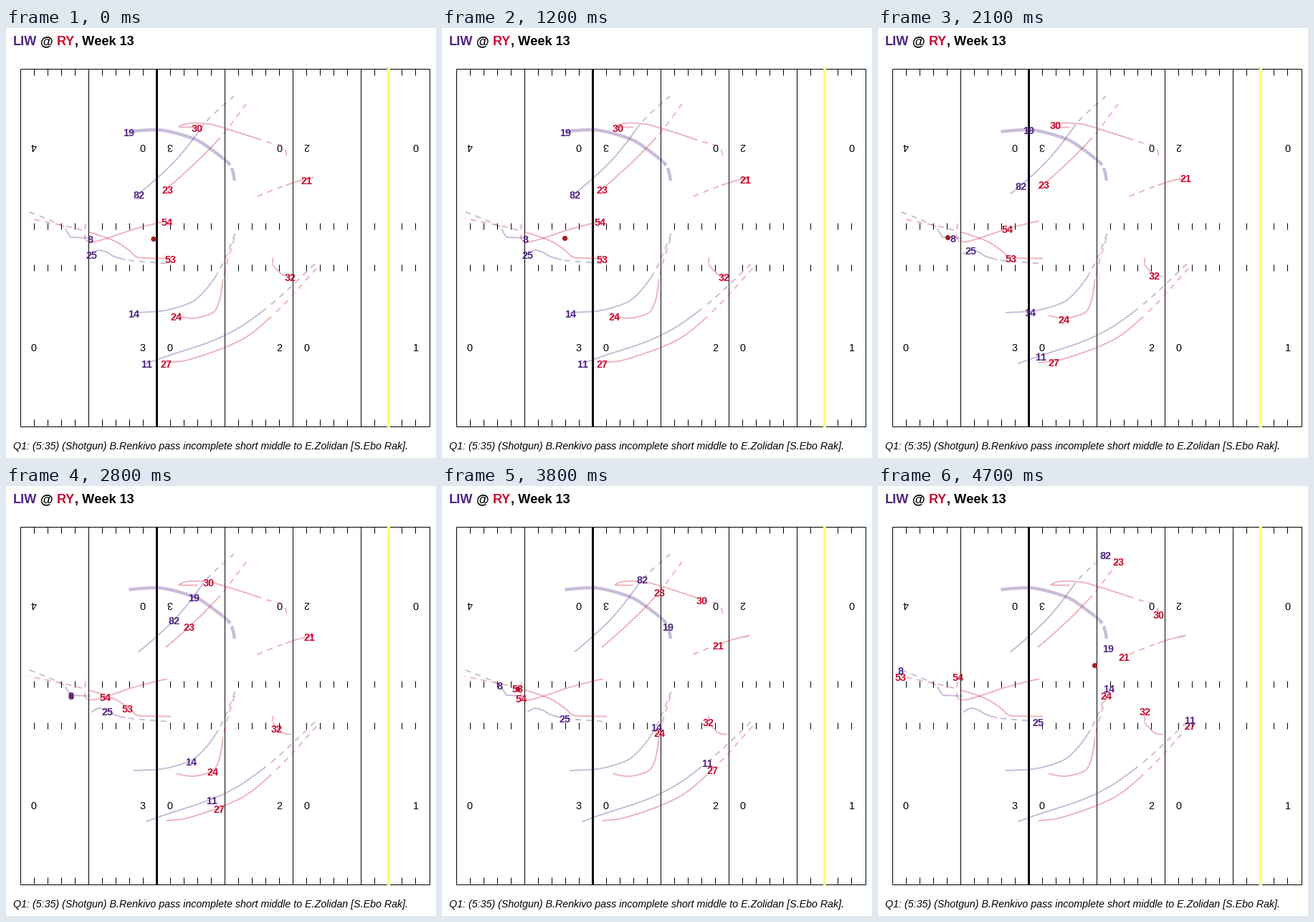
Animation, 600 px wide and 600 px high, one loop 5.8 s. Source, as a matplotlib script:

```python
import numpy as np
import matplotlib.pyplot as plt
from matplotlib.animation import FuncAnimation
from matplotlib.patches import Circle, Rectangle

plt.rcParams["font.family"] = "Liberation Sans"
plt.rcParams["text.kerning_factor"] = 6

SIZE, DPI = 600, 100
PT = 72 / DPI                      # points per pixel
FRAMES, LAST, THROW = 58, 47, 38   # the play rests on its last step
TIMES = (0, 12, 21, 28, 32, 38, 47)
PURPLE, RED = "#4F2683", "#C60C30"

fig = plt.figure(figsize=(SIZE / DPI, SIZE / DPI), dpi=DPI, facecolor="white")
ax = fig.add_axes([0, 0, 1, 1])
ax.set_xlim(0, SIZE)
ax.set_ylim(SIZE, 0)
ax.axis("off")


def write(x, y, s, px=14.4, **kw):
    return ax.text(x, y, s, fontsize=px * PT, va="baseline",
                   rotation_mode="anchor", **kw)


def line(xs, ys, px=1, color="black", **kw):
    kw.setdefault("solid_capstyle", "butt")
    return ax.plot(xs, ys, color=color, lw=px * PT, **kw)[0]


def slopes(t, v):
    """Monotone tangents, so a resting player does not drift."""
    h, d = np.diff(t), np.diff(v) / np.diff(t)
    m = np.zeros(len(v))
    m[0], m[-1] = d[0], d[-1]
    for i in range(1, len(v) - 1):
        a, b = d[i - 1], d[i]
        if a * b > 0:
            w1, w2 = 2 * h[i] + h[i - 1], h[i] + 2 * h[i - 1]
            m[i] = (w1 + w2) / (w1 / a + w2 / b)
    return m


def ease(t, v, q):
    t, v = np.asarray(t, float), np.asarray(v, float)
    m = slopes(t, v)
    i = np.clip(np.searchsorted(t, q, side="right") - 1, 0, len(t) - 2)
    h = t[i + 1] - t[i]
    s = (q - t[i]) / h
    return ((1 + 2 * s) * (1 - s) ** 2 * v[i] + s * (1 - s) ** 2 * h * m[i]
            + s * s * (3 - 2 * s) * v[i + 1] + s * s * (s - 1) * h * m[i + 1])


class Player:
    def __init__(self, number, color, points, extra=(), width=2):
        keys = sorted([(t, *p) for t, p in zip(TIMES, points)] + list(extra))
        t, x, y = zip(*keys)
        self.pos = lambda q: (ease(t, x, q), ease(t, y, q))
        before = np.linspace(0, THROW - 1, 149)
        after = np.linspace(THROW, LAST, 37)
        line(*self.pos(before), width, color, alpha=0.3, zorder=4,
             solid_joinstyle="round")
        line(*self.pos(after), width, color, alpha=0.3, zorder=4,
             linestyle=(0, (4, 3.5)), dash_capstyle="butt")
        self.label = write(0, 0, number, color=color, weight="bold",
                           ha="center", zorder=6)

    def move(self, step):
        x, y = self.pos(np.array([float(step)]))
        self.label.set_position((x[0], y[0] + 6.5))


def draw_field():
    left, right, top, bottom = 19.5, 590.5, 56.5, 555.5
    yard = (right - left) / 30
    for k in range(1, 30):
        x = left + k * yard
        if k % 5 == 0:
            line([x, x], [top, bottom], 3 if k == 10 else 1,
                 zorder=3 if k == 10 else 2)
            continue
        for y0, y1 in ((57, 66), (272, 281), (330, 339), (546, 555)):
            line([x, x], [y0, y1], zorder=2)
    ax.add_patch(Rectangle((left, top), right - left, bottom - top, fill=False,
                           ec="black", lw=PT, zorder=2))
    line([533.5, 533.5], [55, 557], 4, "#FFFF75", zorder=3)

    for k, low, high in zip((1, 9, 11, 19, 21, 29), "030201", "403020"):
        x = left + k * yard
        write(x, 451, low, ha="center", zorder=3)
        write(x, 161, high, ha="center", rotation=180, zorder=3)


def draw_text():
    title = ((9.5, "LIW", PURPLE), (47.7, "@", "black"),
             (70.5, "RY", RED), (95.8, ", Week 13", "black"))
    for x, s, color in title:
        write(x, 24, s, 18.2, color=color, weight="bold")
    write(9.5, 588, "Q1: (5:35) (Shotgun) B.Renkivo pass incomplete short "
          "middle to E.Zolidan [S.Ebo Rak].", 14.2, style="italic")


draw_field()
draw_text()

players = [
    Player("30", RED, [(267, 138.5), (246, 138.5), (248, 134.5), (283, 134),
                       (314, 142.5), (363, 158.5), (392, 178.5)],
           [(16, 241.5, 138), (24, 262, 132.5), (43, 388, 167)]),
    Player("23", RED, [(225, 224.5), (223.5, 224.5), (232, 217.5), (256, 196),
                       (275, 178), (303, 148), (336, 104.5)]),
    Player("21", RED, [(420, 211.5), (424, 210.5), (429, 208.5), (424, 209.5),
                       (410, 213), (386, 221), (344, 237.5)]),
    Player("54", RED, [(225, 269.5), (221, 270), (181, 280), (139, 294),
                       (121, 298.5), (111, 296), (112, 266)],
           [(42, 109.8, 285)]),
    Player("53", RED, [(230, 321.5), (224, 321.5), (186, 320.5), (170, 309),
                       (154, 298.5), (106, 282), (32, 265.5)]),
    Player("24", RED, [(238, 401), (241, 402), (260, 405), (289, 397),
                       (298, 380), (304, 344), (319, 292)]),
    Player("27", RED, [(224, 467), (224, 467), (245, 465), (297, 449),
                       (333, 432.5), (377, 396), (435, 333.5)]),
    Player("32", RED, [(397, 346.5), (394, 346.5), (386, 344.5), (378, 337),
                       (374, 333), (372, 328.5), (373, 313)]),
    Player("19", PURPLE, [(171.5, 144.5), (172, 144.5), (210, 142), (262, 154.5),
                          (288, 170.5), (315, 195.5), (321, 225.5)], width=4.5),
    Player("82", PURPLE, [(185.5, 231), (185.5, 231), (200, 219), (235, 186.5),
                          (255, 163), (280, 130), (318, 95)]),
    Player("14", PURPLE, [(178, 397), (179, 397), (212, 395.5), (258, 383),
                          (277, 367), (299, 335.5), (322, 281)]),
    Player("11", PURPLE, [(196, 468), (196, 468), (227, 457), (287, 437),
                          (323, 419.5), (370, 385.5), (435, 325.5)]),
    Player("25", PURPLE, [(120, 315), (120, 315), (130, 310), (142, 313.5),
                          (149, 318), (171, 324), (224, 328.5)]),
    Player("8", PURPLE, [(117.5, 293), (116.5, 293), (105, 292.5), (91, 292),
                         (88, 289), (81, 278), (32, 256.5)],
           [(42, 61, 268)]),
]

# snap, drop back with the passer, then the throw
BALL_T = (0, 10, 12, 15, 18, 21, 28, 32, 37, 38, 47)
BALL_X = (206, 206, 171.5, 118, 107, 97.5, 91, 88, 84, 106, 302.5)
BALL_Y = (294.5, 294.5, 293.5, 292, 292.5, 292.5, 293, 290.5, 286.5, 283.5, 250.5)
ball = ax.add_patch(Circle((0, 0), 3.6, fc="#A52020", ec="none", zorder=3.5))


def update(i):
    step = i if i < LAST else LAST
    for p in players:
        p.move(step)
    ball.center = (np.interp(step, BALL_T, BALL_X),
                   np.interp(step, BALL_T, BALL_Y))
    return [p.label for p in players] + [ball]


anim = FuncAnimation(fig, update, frames=FRAMES, interval=100, repeat=True,
                     repeat_delay=0, blit=False)
plt.show()
```
